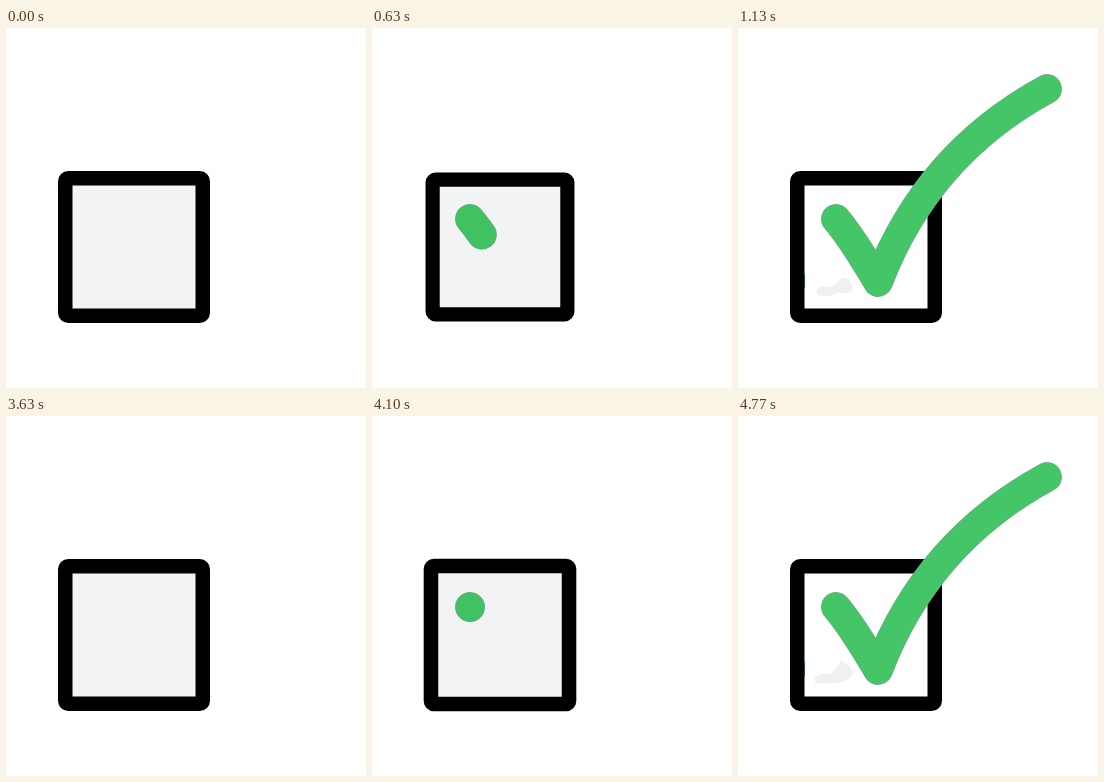
An HTML page for the animation above (7210 ms loop, 360 px wide and 360 px high).

```html
<!DOCTYPE html>
<html lang="en">
<head>
<meta charset="utf-8">
<title>Checkbox</title>
<style>
  html, body { margin: 0; width: 100%; height: 100%; overflow: hidden; background: #fff; }
  svg { display: block; width: 100vw; height: 100vh; }
  .tick { fill: none; stroke-linecap: round; stroke-linejoin: round; }
</style>
</head>
<body>
<svg viewBox="0 0 360 360">
  <rect id="box" x="59.25" y="150.25" width="137.5" height="137.5" rx="3" stroke="#000" stroke-width="14.5"/>
  <g id="smudge" fill="#f0f0f0">
    <path id="smudgeA" d="M78 263Q80 258 91 259Q99 257 102 251Q108 247 114 256V263Q106 267 101 264Q92 270 80 267Z"/>
    <path id="smudgeB" d="M76 263Q79 257 92 258Q99 254 103 244Q111 248 115 256Q113 263 107 265Q94 269 78 267Z"/>
    <path d="M66 246h1v14h-1z" fill="#1c5a2c"/>
  </g>
  <path class="tick" pathLength="1" stroke="#909a92" stroke-width="29.8" d="M98 191Q114 210 140 254Q189 126 309 61"/>
  <path class="tick" id="ink" pathLength="1" stroke-width="29" d="M98 191Q114 210 140 254Q189 126 309 61"/>
</svg>
<script>
const LOOP = 7210, SECOND = 3630, DRAW_START = 440, DRAW_END = 1130;
const PULSE = [[0, 1], [333, 1.05], [567, 0.97], [730, 1]];
const $ = id => document.getElementById(id);
const ticks = document.querySelectorAll('.tick');
const show = (el, on) => el.style.display = on ? '' : 'none';

function pulse(t) {
  const i = PULSE.findIndex(key => t < key[0]);
  if (i < 0) return 1;
  const [t0, a] = PULSE[i - 1], [t1, b] = PULSE[i];
  return a + (b - a) * (1 - Math.cos(Math.PI * (t - t0) / (t1 - t0))) / 2;
}

function render(now) {
  const time = now % LOOP, again = time >= SECOND;
  const t = again ? Math.max(0, time - SECOND - 10) : time;
  const done = t >= DRAW_END;

  $('box').setAttribute('transform', `translate(128 219) scale(${pulse(t)}) translate(-128 -219)`);
  $('box').setAttribute('fill', done ? '#fff' : '#f2f3f5');
  show($('smudge'), done);
  show($('smudgeA'), !again);
  show($('smudgeB'), again);

  const drawn = Math.min(1, Math.max(0, (t - DRAW_START) / (DRAW_END - DRAW_START))) ** 2.2;
  for (const tick of ticks) {
    show(tick, drawn > 0);
    tick.setAttribute('stroke-dasharray', done ? 'none' : `${drawn} 2`);
  }
  $('ink').setAttribute('stroke', done ? '#44c568' : '#40c162');
}

const start = performance.now();
function tick() {
  render(performance.now() - start);
  requestAnimationFrame(tick);
}
tick();
</script>
</body>
</html>
```
